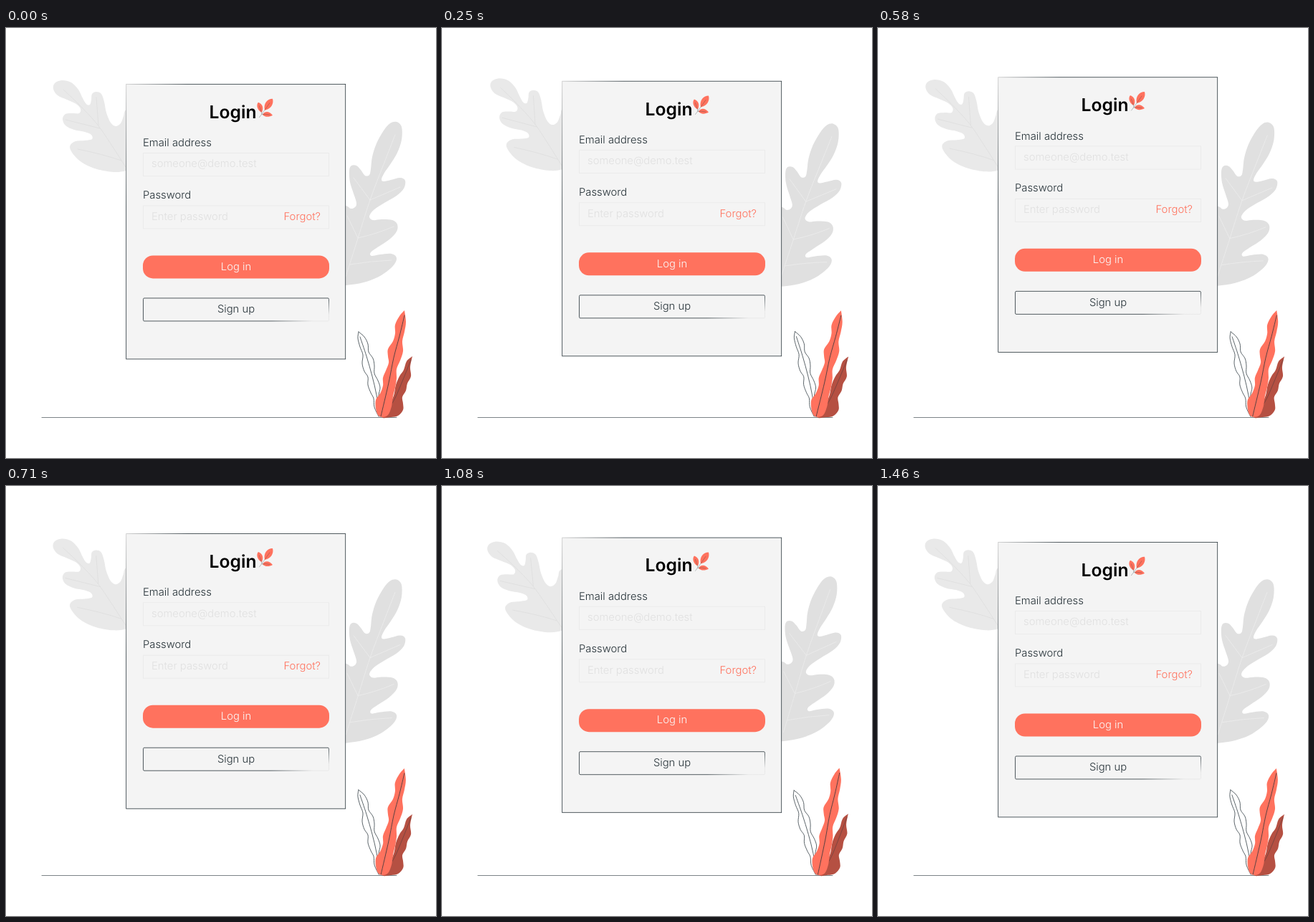
These frames come from a looping animation (600x600 px, 1.5 s). An HTML page:

```html
<!DOCTYPE html>
<html lang="en">
<head>
<meta charset="utf-8">
<title>Login</title>
<style>
  html, body { margin: 0; width: 100%; height: 100%; overflow: hidden; background: #fff; }
  svg { display: block; width: 100%; height: 100%; }
  path, line { fill: none; stroke-linecap: round; stroke-linejoin: round; }
  text { font: 300 14.8px Inter, "Open Sans", sans-serif; fill: #263238; text-rendering: geometricPrecision; }
  .title { font-size: 24.7px; font-weight: 600; fill: #000; }
  .hint { fill: #e0e0e0; }
  .middle { text-anchor: middle; }
  .left { fill: #e9e9e9; }
  .right { fill: #e0e0e0; }
  .left-vein { stroke: #dedede; stroke-width: .8; }
  .right-vein { stroke: #ebebeb; stroke-width: .9; }
  .input { fill: none; stroke: #ebebeb; }
  .ink { stroke: #263238; stroke-width: .75; }
  .coral { fill: #ff725e; }
  .rust { fill: #b55042; }
</style>
</head>
<body>
<svg viewBox="0 0 600 600">
  <defs>
    <linearGradient id="card-edge" gradientUnits="userSpaceOnUse" x1="168" y1="79" x2="236" y2="113">
      <stop stop-color="#c8c8c8"/><stop offset="1" stop-color="#263238"/>
    </linearGradient>
    <linearGradient id="button-edge" gradientUnits="userSpaceOnUse" x1="370" y1="409" x2="378" y2="429">
      <stop stop-color="#263238"/><stop offset="1" stop-color="#e6e6e6"/>
    </linearGradient>
  </defs>

  <g id="leaves">
    <path class="left" data-points="190,108 168,114 164,123 160,133 153,137 146,132 140,118 137,103 133,92 126,89 120,92 119,100 117,107 112,106 107,98 101,86 91,76 78,73 68,77 66,85 72,94 85,100 98,106 104,113 102,119 93,119 83,120 79,127 83,136 95,142 110,145 119,149 120,155 110,157 97,158 90,163 90,170 98,181 110,190 127,197 150,201 168,199 190,190"/>
    <path class="left-vein" data-points="80,86 102,107 127,134 147,163 167,194"/>
    <path class="left-vein" d="M126 97L129 136M83 128L131 140M100 169Q135 176 161 185"/>
    <path class="right" data-points="450,244 474,248 481,252 487,250 489,244 485,231 480,215 479,199 482,192 489,192 495,198 501,206 507,205 509,197 511,180 517,161 527,143 536,133 545,131 552,138 552,156 546,174 537,189 528,202 524,211 527,214 537,212 550,209 557,213 555,224 545,234 528,244 513,254 507,263 512,268 524,267 539,268 546,274 545,284 535,295 520,305 509,313 510,318 522,316 538,315 545,321 540,332 522,346 499,355 474,359 450,360"/>
    <path class="right-vein" data-points="543,149 527,190 508,240 489,300 474,347"/>
    <path class="right-vein" d="M485 209L508 240M550 222L508 240M541 277Q518 287 491 293M538 324Q510 325 480 330M476 262L491 293"/>
  </g>

  <line class="ink" x1="50" y1="543.5" x2="545" y2="543.5" opacity=".8"/>

  <g id="plants">
    <path class="ink" data-points="492,424 500,431 505,441 506,452 512,461 514,471 514,482 519,492 522,502 520,513 522,525 521,542"/>
    <path class="ink" data-points="492,424 491,433 494,445 498,456 497,468 500,479 505,487 505,498 509,509 513,517 514,529 520,542"/>
    <path class="ink" data-points="494,431 503,458 511,486 517,512 521,540"/>
    <path class="rust" data-points="567,458 559,465 555,477 549,486 544,498 541,513 534,528 525,543 537,543 547,541 554,533 554,524 553,515 558,506 560,496 565,486 564,473 567,458"/>
    <path class="ink" data-points="565,463 553,493 541,520 526,542" opacity=".5"/>
    <path class="coral" data-points="556,394 549,402 543,414 543,426 540,437 533,448 533,458 534,467 530,478 526,488 526,499 522,510 516,519 516,531 519,540 525,543 533,540 538,528 540,514 543,502 545,489 545,476 550,464 554,451 553,437 556,424 558,410 556,394"/>
    <path class="ink" data-points="556,401 549,430 541,460 534,495 523,542"/>
  </g>

  <g id="card">
    <rect x="167.7" y="78.7" width="306" height="383.6" fill="#f4f4f4" stroke="url(#card-edge)" stroke-width=".8"/>
    <text class="title" x="283.5" y="126">Login</text>
    <path class="coral" d="M361 115C359 106 364 99 372 99C374 106 370 113 361 115ZM357 118C350 115 349 107 352 104C358 106 360 112 357 118ZM358 121C362 115 368 117 372 122C367 125 361 125 358 121Z"/>
    <path class="ink" d="M353.5 125Q358 119 368 105M357 120L353.5 109M357 121Q362 120 368 121.5" style="stroke-width:.5" opacity=".6"/>
    <text x="191" y="165.5">Email address</text>
    <rect class="input" x="191.5" y="174.8" width="259" height="32.2"/>
    <text class="hint" x="203" y="194.8">someone@demo.test</text>
    <text x="191" y="238.3">Password</text>
    <rect class="input" x="191.5" y="248.3" width="259" height="32"/>
    <text class="hint" x="203" y="268.3">Enter password</text>
    <text class="coral" x="387.5" y="268.3">Forgot?</text>
    <rect class="coral" x="191" y="317.8" width="260" height="32" rx="14"/>
    <text class="middle" x="321" y="338" style="fill:#fafafa">Log in</text>
    <rect x="191.5" y="377.3" width="259" height="32" rx="1.5" fill="none" stroke="url(#button-edge)" stroke-width=".8"/>
    <text class="middle" x="321" y="397.8">Sign up</text>
  </g>
</svg>
<script>
  const LOOP = 1500;
  const [leaves, plants, card] = ["leaves", "plants", "card"].map(id => document.getElementById(id));

  // Catmull-Rom spline through the listed points
  function spline(text) {
    const p = text.split(" ").map(pair => pair.split(",").map(Number));
    const at = i => p[Math.max(0, Math.min(p.length - 1, i))];
    let d = "M" + p[0];
    for (let i = 0; i < p.length - 1; i++) {
      const handle = (k, sign) => [0, 1].map(c => at(k)[c] + sign * (at(k + 1)[c] - at(k - 1)[c]) / 6);
      d += `C${handle(i, 1)} ${handle(i + 1, -1)} ${p[i + 1]}`;
    }
    return d;
  }
  for (const path of document.querySelectorAll("[data-points]")) {
    path.setAttribute("d", spline(path.dataset.points));
  }

  // Triangle wave: 1 at the peak time, 0 half a loop later
  const triangle = (t, peak) => Math.abs(1 - 2 * (((t - peak) / LOOP + 1) % 1));

  function draw(now) {
    const t = now % LOOP;
    const sway = 2 * triangle(t, 333) - 1;
    leaves.setAttribute("transform", `rotate(${sway - .11} 315 220)`);
    plants.setAttribute("transform", `rotate(${sway - .11} 529 468)`);
    card.setAttribute("transform", `translate(0 ${12.4 * (triangle(t, 1480) - 1)})`);
    requestAnimationFrame(draw);
  }
  draw(performance.now());
</script>
</body>
</html>
```
